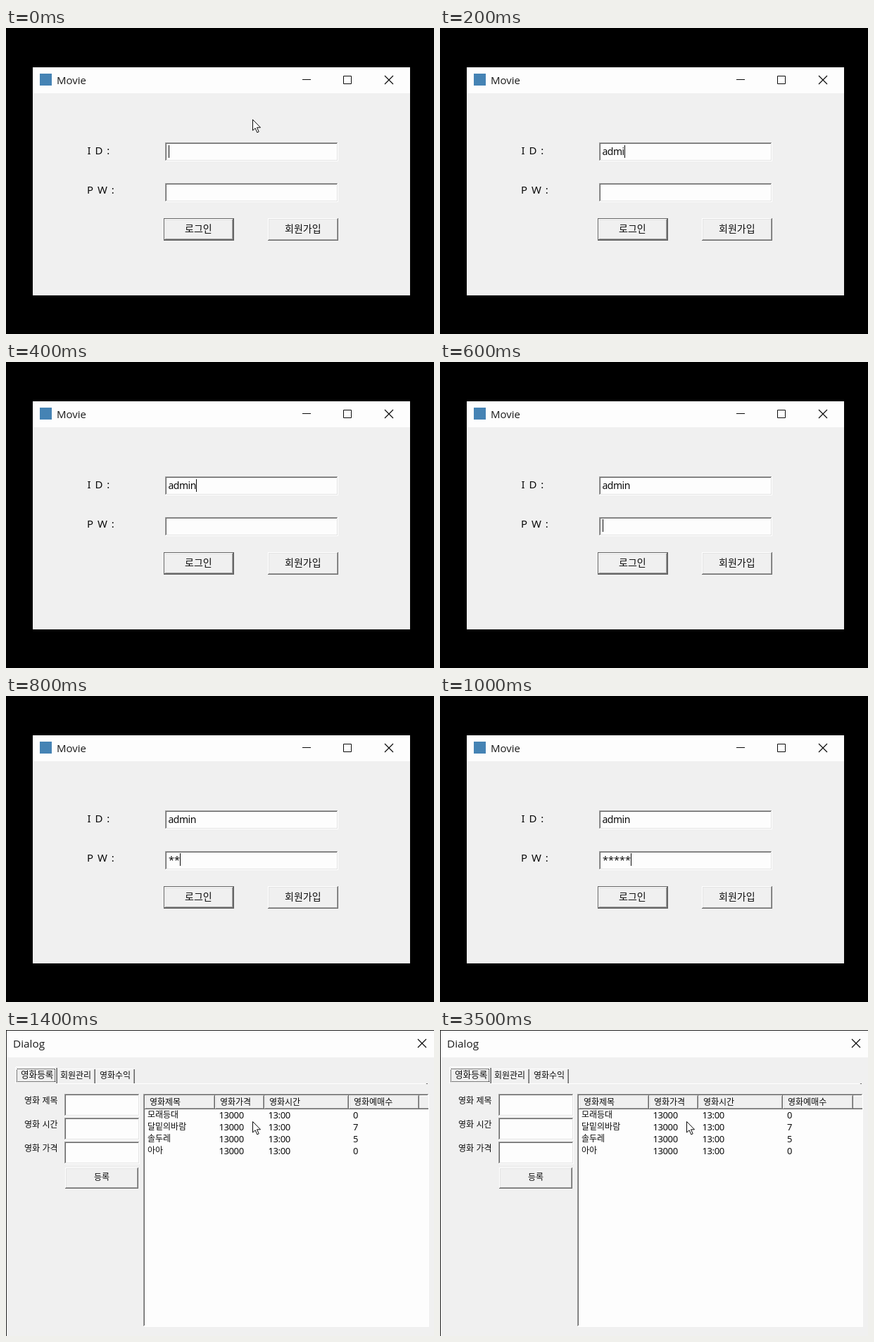
Write an HTML page that moves like this. It is 608 by 436 pixels and loops after 3.7 s.

```html
<!DOCTYPE html>
<html lang="ko">
<head>
<meta charset="utf-8">
<title>Movie login</title>
<style>
  html, body { margin: 0; width: 100%; height: 100%; overflow: hidden; background: #000; }
  svg { display: block; width: 608px; height: 436px; }
  rect { shape-rendering: crispEdges; }
  text { fill: #0c0c0c; white-space: pre; }
  .title { font-family: "Open Sans", sans-serif; fill: #1a1a1a; }
  .ko { font-family: "Noto Sans CJK KR", "Noto Sans CJK", sans-serif; }
  .label { font: 15px "Noto Sans", sans-serif; word-spacing: 2px; }
  .input { font: 14px "Noto Sans", sans-serif; letter-spacing: -.5px; }
  .stars { font: 14.5px "Noto Sans", sans-serif; }
  .num { font: 13px "Noto Sans", sans-serif; letter-spacing: -.4px; }
</style>
</head>
<body>
<svg id="stage" viewBox="0 0 608 436"></svg>
<script>
const NS = 'http://www.w3.org/2000/svg';
const stage = document.getElementById('stage');
const WHITE = '#fdfdfd', FACE = '#f0f0f0', DARK = '#696969', MID = '#a0a0a0', LIGHT = '#e3e3e3', INK = '#0c0c0c';
const SUNKEN = [MID, DARK, '#fff', LIGHT];
const RAISED = ['#fff', LIGHT, DARK, MID];

function add(parent, tag, attrs) {
  const node = document.createElementNS(NS, tag);
  for (const key in attrs) node.setAttribute(key, attrs[key]);
  return parent.appendChild(node);
}
const group = () => add(stage, 'g', {});
const box = (g, x, y, width, height, fill) => add(g, 'rect', { x, y, width, height, fill });
const line = (g, d, width = 1) => add(g, 'path', { d, fill: 'none', stroke: INK, 'stroke-width': width });

function text(g, x, y, str, cls, size) {
  const node = add(g, 'text', { x, y, class: cls });
  if (size) node.style.fontSize = size + 'px';
  node.textContent = str;
  return node;
}
const ko = (g, x, y, str, size = 12) => text(g, x, y, str, 'ko', size);

// Two-pixel edge: outer and inner colours for top-left, then bottom-right.
function bevel(g, x, y, w, h, [tl, tl2, br, br2], fill) {
  box(g, x, y, w, h, br);
  box(g, x, y, w - 1, h - 1, tl);
  box(g, x + 1, y + 1, w - 2, h - 2, br2);
  box(g, x + 1, y + 1, w - 3, h - 3, tl2);
  box(g, x + 2, y + 2, w - 4, h - 4, fill);
}
const field = (g, x, y, w, h) => bevel(g, x, y, w, h, SUNKEN, WHITE);
const button = (g, x, y, w, h) => bevel(g, x, y, w, h, RAISED, FACE);
const cross = (g, x, y) => line(g, `M${x} ${y}l12 12m0 -12l-12 12`, 1.2);

function buildLogin() {
  const g = group();
  box(g, 0, 0, 608, 436, '#000');
  box(g, 38, 56, 536, 325, FACE);
  box(g, 38, 56, 536, 37, WHITE);
  box(g, 48, 65, 17, 17, '#4583b4');
  text(g, 72, 80, 'Movie', 'title', 15);
  box(g, 421, 73, 12, 1, INK);
  line(g, 'M479.5 68.5h11v11h-11z');
  cross(g, 538, 68);

  text(g, 115.5, 180, 'I D :', 'label');
  text(g, 115, 236, 'P W :', 'label');
  field(g, 226, 163, 246, 27);
  field(g, 226, 221, 246, 27);
  box(g, 224, 271, 100, 32, '#646464');
  button(g, 225, 272, 98, 30);
  button(g, 372, 271, 100, 32);
  ko(g, 254, 291, '로그인', 14);
  ko(g, 396, 291, '회원가입', 14);
  return g;
}

function buildDialog() {
  const g = group();
  box(g, 0, 0, 608, 436, FACE);
  box(g, 0, 0, 608, 39, WHITE);
  box(g, 0, 0, 608, 1, '#222');
  box(g, 0, 0, 1, 436, '#222');
  text(g, 10, 25, 'Dialog', 'title', 15.3);
  cross(g, 585, 13);

  // Tab strip
  box(g, 13, 53, 1, 23, '#fff');
  box(g, 14, 52, 57, 1, '#fff');
  box(g, 73, 55, 52, 1, '#fff');
  box(g, 128, 55, 53, 1, '#fff');
  box(g, 72, 76, 526, 1, '#fff');
  box(g, 597, 76, 2, 1, DARK);
  for (const [x, y] of [[71, 54], [125, 56], [181, 56]]) {
    box(g, x, y, 1, 76 - y, MID);
    box(g, x + 1, y, 1, 76 - y, DARK);
  }
  add(g, 'rect', { x: 15.5, y: 55.5, width: 54, height: 18, fill: 'none', stroke: INK, 'stroke-dasharray': '1 1' });
  ko(g, 21, 68, '영화등록', 12.6);
  ko(g, 77, 69, '회원관리');
  ko(g, 133, 69, '영화수익');

  ['영화 제목', '영화 시간', '영화 가격'].forEach((name, i) => {
    ko(g, 26, 105 + 34 * i, name);
    field(g, 83, 91 + 34 * i, 107, 32);
  });
  button(g, 84, 196, 104, 30);
  ko(g, 125, 214, '등록');

  // Movie list
  bevel(g, 195, 91, 406, 332, [MID, DARK, '#fff', WHITE], WHITE);
  const edges = [197, 297, 367, 487, 587, 600];
  const heads = ['영화제목', '영화가격', '영화시간', '영화예매수'];
  edges.slice(0, 5).forEach((x, i) => {
    const w = edges[i + 1] - x;
    if (i < 4) button(g, x, 93, w, 20);
    else {
      box(g, x, 93, w, 20, FACE);
      box(g, x, 93, w, 1, '#fff');
      box(g, x, 111, w, 1, MID);
      box(g, x, 112, w, 1, DARK);
    }
    if (heads[i]) ko(g, x + 7, 107, heads[i]);
  });
  [['모래등대', 0], ['달밑의바람', 7], ['솔두레', 5], ['아아', 0]].forEach(([name, sold], i) => {
    const y = 126 + 17 * i;
    ko(g, 201, y - 1, name);
    text(g, 302.5, y, '13000', 'num');
    text(g, 372.5, y, '13:00', 'num');
    text(g, 493, y, sold, 'num');
  });
  return g;
}

const login = buildLogin();
const idText = text(login, 230.5, 181, '', 'input');
const pwText = text(login, 231, 239, '', 'stars');
const caret = box(login, 231, 167, 1, 18, INK);
const dialog = buildDialog();
const pointer = add(stage, 'path', {
  d: 'M350.5 130.5v15.5l3.6 -3.3l2.7 6.2l2.4 -1.1l-2.7 -6h5z',
  fill: '#fff', stroke: INK, 'stroke-width': 1
});

const LOOP = 3700;
// Start time, ID, password length, caret x, caret y, pointer shown, dialog shown
const steps = [
  [0, '', 0, 231, 167, true, false],
  [200, 'admi', 0, 262, 167, false, false],
  [400, 'admin', 0, 270, 167, false, false],
  [600, 'admin', 0, 231, 224, false, false],
  [800, 'admin', 2, 247, 224, false, false],
  [1000, 'admin', 5, 271, 224, false, false],
  [1400, 'admin', 5, 271, 224, true, true]
];
const show = (node, on) => { node.style.display = on ? '' : 'none'; };

let current;
function render(t) {
  const step = steps.filter(s => s[0] <= t).pop();
  if (step === current) return;
  current = step;
  const [, id, stars, x, y, hasPointer, hasDialog] = step;
  idText.textContent = id;
  pwText.textContent = '*'.repeat(stars);
  caret.setAttribute('x', x);
  caret.setAttribute('y', y);
  show(pointer, hasPointer);
  show(dialog, hasDialog);
  show(login, !hasDialog);
}

const start = performance.now();
function tick() {
  render((performance.now() - start) % LOOP);
  requestAnimationFrame(tick);
}
tick();
</script>
</body>
</html>
```
